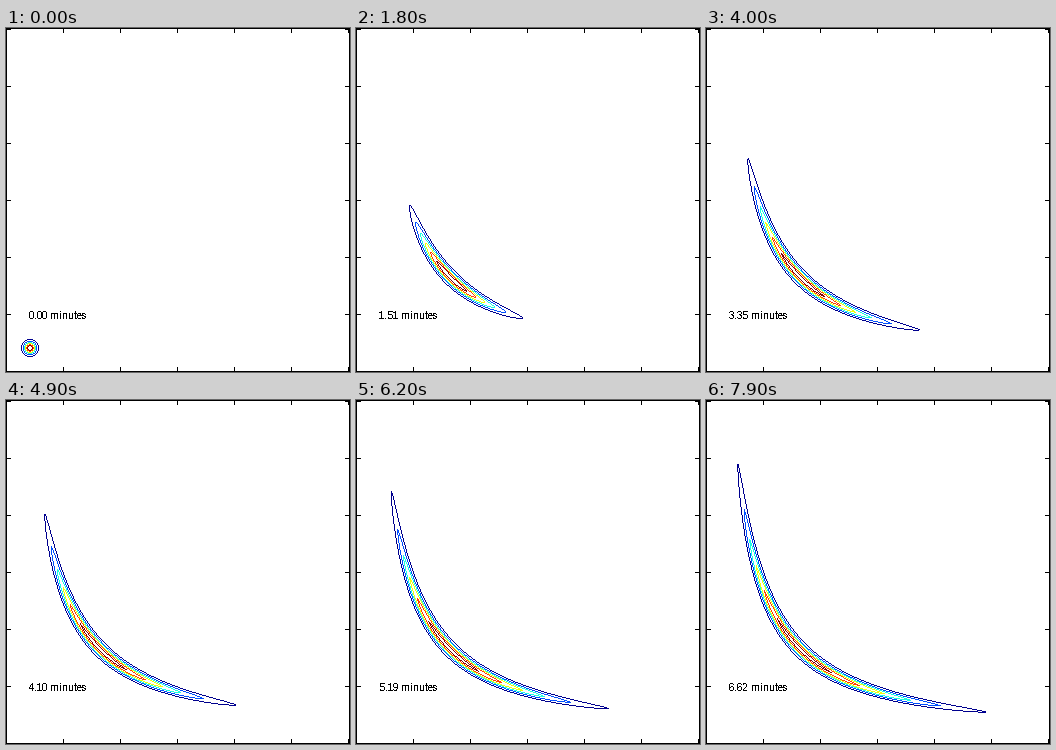
A matplotlib script for the animation above (8000 ms loop, 344 px wide and 344 px high).

```python
import numpy as np
import matplotlib.pyplot as plt
from matplotlib.animation import FuncAnimation
from matplotlib.patches import Rectangle

SIZE, DPI = 344, 86
FRAMES, INTERVAL = 80, 100
PX = 72 / DPI                 # one pixel in points
MINUTES = 0.08377             # simulated minutes per step

# Two species made at the same rate that annihilate in pairs:
# the sum settles on a hyperbola while the difference diffuses freely.
START, MEAN = 24.0, 94.5
NOISE = 0.34                  # variance of the sum per pixel of mean
RATE = 1.2                    # relaxation per step
SPREAD0, SPREAD = 42.0, 176.0

COLORS = np.array([(0, 0, 0.56), (0, 0.31, 1), (0.125, 1, 0.875),
                   (0.94, 1, 0.06), (1, 0.25, 0), (0.5, 0, 0)])

plt.rcParams.update({"text.antialiased": False, "text.hinting_factor": 1})
fig = plt.figure(figsize=(SIZE / DPI, SIZE / DPI), dpi=DPI, facecolor="white")
ax = fig.add_axes([0, 0, 1, 1])
ax.axis("off")

# Pixel centres in sum and difference coordinates
x, y = np.meshgrid(np.arange(SIZE) + 0.5, np.arange(SIZE) + 0.5)
total, diff = x + y, x - y
limit = np.hypot(diff, 2 * MEAN)


def block(left, bottom, w, h):
    ax.add_patch(Rectangle((left, bottom), w, h, fc="black", lw=0,
                           antialiased=False))


def draw_box():
    for edge in (0, SIZE - 1):
        block(0, edge, SIZE, 1)
        block(edge, 0, 1, SIZE)
    for p in range(57, SIZE, 57):
        for start in (0, SIZE - 5):
            block(p, start, 1, 5)
            block(start, p, 5, 1)


def density(step):
    """Density relative to its peak at every pixel."""
    var = SPREAD0 + SPREAD * step
    ridge = limit * np.tanh(RATE * limit / (2 * MEAN) * step
                            + np.arctanh(2 * START / np.maximum(limit, 50)))
    settled = 2 * MEAN ** 2 * NOISE / limit
    width2 = settled + (SPREAD0 - settled) * np.exp(-4 * RATE * step)
    rho = np.exp(-diff ** 2 / (2 * var) - (total - ridge) ** 2 / (2 * width2))
    rho /= np.sqrt(width2)
    return rho / np.diag(rho).max()


def outline(region):
    """One-pixel line along the inside of a region."""
    inner = region.copy()
    for axis in (0, 1):
        for shift in (-1, 1):
            inner &= np.roll(region, shift, axis)
    return region & ~inner


def contours(step):
    rho = density(step)
    levels = np.linspace(0.148 - 0.00012 * step, 0.86 + 0.0007 * step, 6)
    picture = np.ones((SIZE, SIZE, 3))
    for level, color in zip(levels, COLORS):
        picture[outline(rho >= level)] = color
    return picture


image = ax.imshow(contours(0), origin="lower", extent=(0, SIZE, 0, SIZE),
                  interpolation="nearest", aspect="auto")
draw_box()
label = ax.text(22.8, 53, "", family="Liberation Sans", size=10.4 * PX,
                color="black", va="baseline", ha="left")


def update(step):
    image.set_data(contours(step))
    label.set_text(f"{step * MINUTES:.2f} minutes")
    return image, label


anim = FuncAnimation(fig, update, frames=FRAMES, interval=INTERVAL,
                     init_func=lambda: [], repeat=True, repeat_delay=0,
                     blit=False)
plt.show()
```
